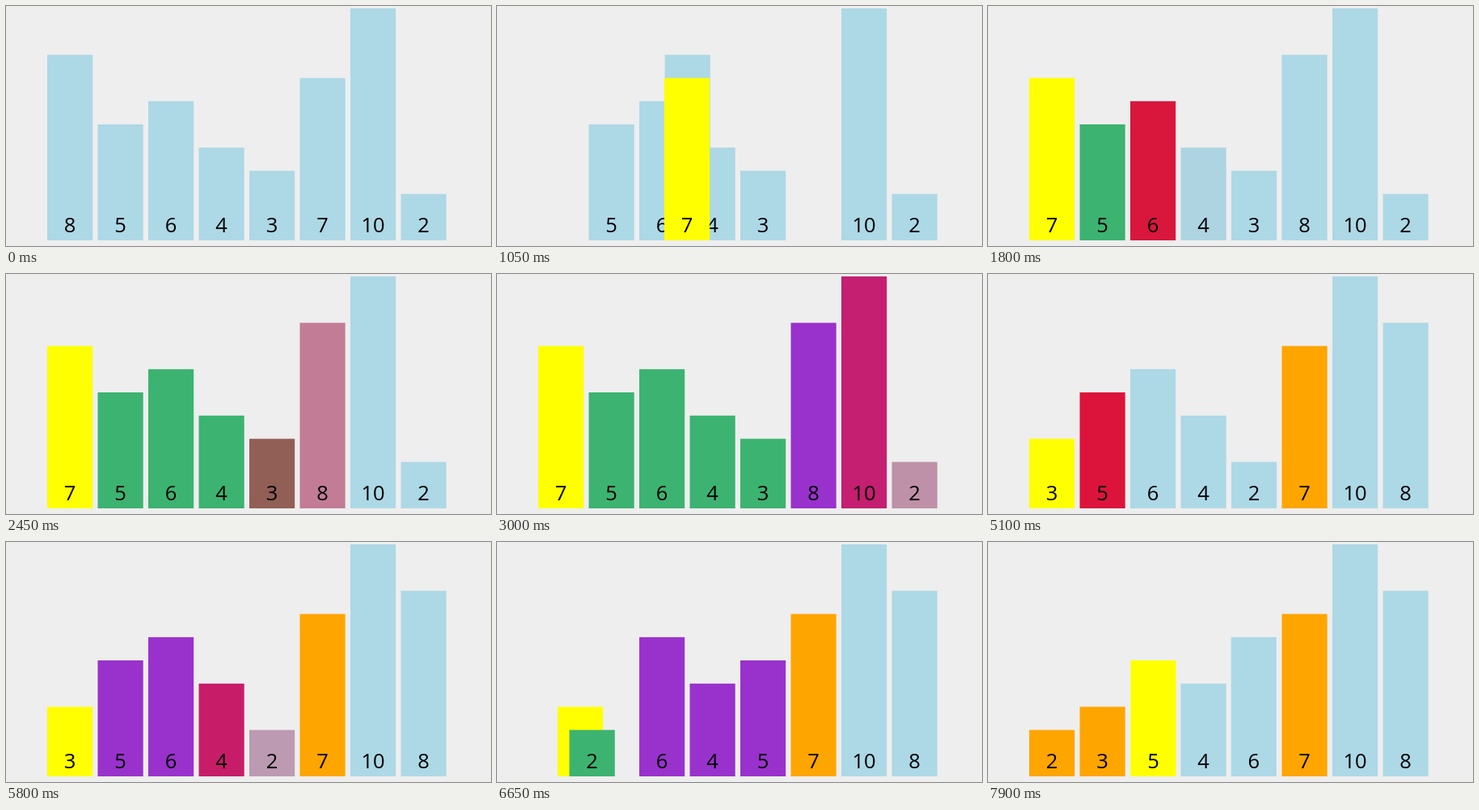
An HTML page that plays this animation: 600x298 px, repeating every 8 s.

```html
<!DOCTYPE html>
<html lang="en">
<head>
<meta charset="utf-8">
<title>Quick sort</title>
<style>
  html, body { margin: 0; width: 100%; height: 100%; overflow: hidden; background: #eee; }
  svg { display: block; width: 100%; height: 100%; }
  text { font: 25.5px "Open Sans", "Noto Sans", sans-serif; text-anchor: middle; }
</style>
</head>
<body>
<svg id="stage" viewBox="0 0 600 298"></svg>
<script>
const LOOP = 8000, TICK = 50, START = 629, STEP = 280.6;
const LEFT = 51, PITCH = 62.5, WIDTH = 56.2, BASE = 291, UNIT = 28.8;
const PLAIN = [173, 216, 230], PIVOT = [255, 255, 0], CHECK = [220, 20, 60],
      LOW = [60, 179, 113], HIGH = [153, 50, 204], DONE = [255, 165, 0];

const values = [8, 5, 6, 4, 3, 7, 10, 2];
const pivots = [5, 4, 4];
const states = [];

// Record every step of the sort as slot and colour per bar.
const order = values.map((_, i) => i);
const colors = values.map(() => PLAIN);

function push() {
  states.push(values.map((_, id) => ({ slot: order.indexOf(id), color: colors[id] })));
}

function paint(slot, color) { colors[order[slot]] = color; }

function swap(a, b) {
  if (a === b) return;
  [order[a], order[b]] = [order[b], order[a]];
  push();
}

function partition(lo, hi) {
  const pick = pivots.length ? pivots.shift() : lo;
  paint(pick, PIVOT);
  push();
  swap(pick, lo);
  let store = lo + 1;
  for (let i = lo + 1; i <= hi; i++) {
    paint(i, CHECK);
    push();
    if (values[order[i]] < values[order[lo]]) {
      swap(i, store);
      paint(store++, LOW);
    } else {
      paint(i, HIGH);
    }
  }
  push();
  swap(store - 1, lo);
  for (let i = lo; i <= hi; i++) paint(i, PLAIN);
  return store - 1;
}

function sort(lo, hi) {
  if (lo > hi) return;
  const mid = lo === hi ? lo : partition(lo, hi);
  paint(mid, DONE);
  push();
  if (lo === hi) return;
  sort(lo, mid - 1);
  sort(mid + 1, hi);
}

push();
sort(0, values.length - 1);

function add(parent, tag, attrs) {
  const el = document.createElementNS("http://www.w3.org/2000/svg", tag);
  for (const key in attrs) el.setAttribute(key, attrs[key]);
  return parent.appendChild(el);
}

const stage = document.getElementById("stage");
const bars = values.map(v => {
  const group = add(stage, "g", {});
  const rect = add(group, "rect", { y: BASE - v * UNIT, width: WIDTH, height: v * UNIT });
  add(group, "text", { x: WIDTH / 2, y: 281 }).textContent = v;
  return { group, rect };
});

const mix = (a, b, k) => a + (b - a) * k;
const ease = t => t < 0.5 ? 4 * t ** 3 : 1 - 4 * (1 - t) ** 3;

function draw(ms) {
  const pos = Math.max(0, (ms - START) / STEP);
  const n = Math.floor(pos), k = ease(pos - n);
  bars.forEach(({ group, rect }, id) => {
    const from = states[n][id], to = states[n + 1][id];
    const x = LEFT + PITCH * mix(from.slot, to.slot, k);
    const rgb = from.color.map((c, i) => Math.round(mix(c, to.color[i], k)));
    group.setAttribute("transform", `translate(${x.toFixed(2)} 0)`);
    rect.setAttribute("fill", `rgb(${rgb})`);
  });
}

function frame() {
  const ms = performance.now() % LOOP;
  draw(Math.floor(ms / TICK) * TICK);
  requestAnimationFrame(frame);
}
frame();
</script>
</body>
</html>
```
